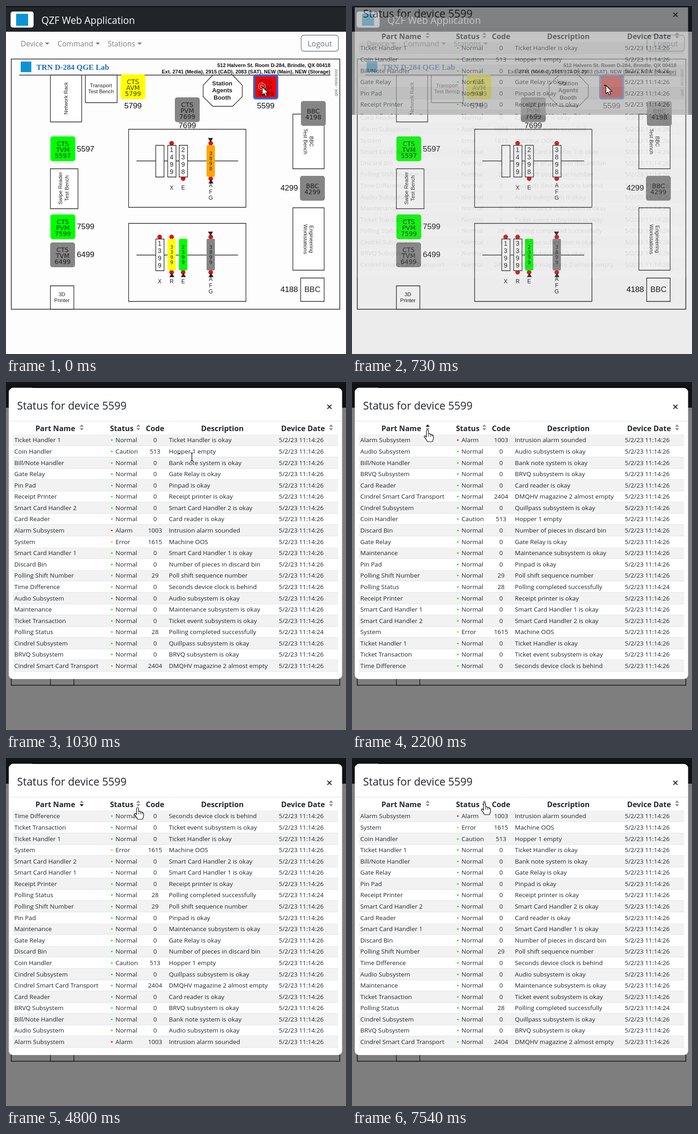
Animation of 739 by 758 pixels, one loop 8 s. Source, as an HTML page with a canvas:

```html
<!DOCTYPE html>
<html lang="en">
<head>
<meta charset="utf-8">
<title>Device status</title>
<style>
  html, body { margin: 0; height: 100%; overflow: hidden; background: #fdfdfd; }
  canvas { display: block; }
</style>
</head>
<body>
<canvas id="stage" width="739" height="758"></canvas>
<script>
const W = 739, H = 758, LOOP = 8000;
const UI = '"Open Sans", sans-serif';
const SANS = '"Liberation Sans", sans-serif';
const SERIF = '"Liberation Serif", serif';
const LABEL = '"DejaVu Sans", sans-serif';
const GREEN = '#0f0', GREY = '#858585', YELLOW = '#ff0', INK = '#212529', LINE = '#222';

const screen2d = document.getElementById('stage').getContext('2d');
const modalCanvas = Object.assign(document.createElement('canvas'), { width: W, height: H });
const modal2d = modalCanvas.getContext('2d');
let g = screen2d; // context currently drawn to

// ---------- helpers ----------
// y is the middle of the capital letters; level text sits on a whole pixel
function text(str, x, y, size, { font = SANS, color = LINE, align = 'center', weight = 400, turn = 0 } = {}) {
  const drop = size * 0.36;
  g.save();
  g.translate(x, turn ? y : Math.round(y + drop));
  g.rotate(turn * Math.PI / 2);
  g.font = `${weight} ${size}px ${font}`;
  g.fillStyle = color;
  g.textAlign = align;
  g.fillText(str, 0, turn ? drop : 0);
  g.restore();
}

// strokes run through pixel centres
function outline(color, width) {
  g.strokeStyle = color;
  g.lineWidth = width;
  g.stroke();
}

function box(x, y, x2, y2, { fill, stroke, r = 0, width = 1.3 } = {}) {
  const shift = stroke ? 0.5 : 0;
  g.beginPath();
  g.roundRect(x + shift, y + shift, x2 - x, y2 - y, r);
  if (fill) { g.fillStyle = fill; g.fill(); }
  if (stroke) outline(stroke, width);
}

function line(x, y, x2, y2, color = LINE, width = 1.3) {
  g.beginPath();
  g.moveTo(x + 0.5, y + 0.5);
  g.lineTo(x2 + 0.5, y2 + 0.5);
  outline(color, width);
}

function poly(points, fill, stroke) {
  g.beginPath();
  points.forEach(([x, y]) => g.lineTo(x + 0.5, y + 0.5));
  g.closePath();
  if (fill) { g.fillStyle = fill; g.fill(); }
  if (stroke) outline(stroke, 1.3);
}

// positive height points down, negative up
const triangle = (x, y, half, height, color) =>
  poly([[x - half, y], [x + half, y], [x, y + height]], color);

function disc(x, y, r, fill, stroke, width = 1) {
  g.beginPath();
  g.arc(x, y, r, 0, 7);
  if (fill) { g.fillStyle = fill; g.fill(); }
  if (stroke) outline(stroke, width);
}

// ---------- floor plan page ----------
function device(x, y, color, lines, ink = 'rgba(0,0,0,.75)') {
  box(x, y, x + 54, y + 54, { fill: color, r: 5 });
  const first = y + 28.7 - 6.5 * (lines.length - 1);
  lines.forEach((s, i) => text(s, x + 27, first + i * 13, 13.7, { font: LABEL, color: ink }));
}

function room(x, y, x2, y2, lines, cx, cy, { turn = 0, size = 11.3, pitch = 13.5, weight } = {}) {
  if (x != null) box(x, y, x2, y2, { fill: '#fff', stroke: LINE });
  lines.forEach((s, i) => {
    const d = (i - (lines.length - 1) / 2) * pitch;
    text(s, cx - turn * d, cy + (turn ? 0 : d), size, { turn, weight });
  });
}

function gate(x, y, id, { color, top, bottom, arrows = '', label = '' }) {
  const dot = cy => disc(x, cy, 4.5, '#f00', '#611', 0.8);
  if (top) dot(y - 4);
  if (bottom) dot(y + 73);
  if (arrows.includes('t')) triangle(x - 1, y - 16, 5.5, 9, LINE);
  if (arrows.includes('b')) triangle(x, y + 83, 5.5, -9, LINE);
  box(x - 9, y, x + 9, y + 69, color ? { fill: color, r: 3 } : { fill: '#fff', stroke: LINE });
  [...id].forEach((c, i) => color
    ? text(c, x, y + 18 + i * 11, 10.5, { font: LABEL })
    : text(c, x, y + 9.5 + i * 16, 14));
  const stacked = label.length > 1;
  [...label].forEach((c, i) => text(c, x, y + (stacked ? 88 : 93) + i * 13.5, 12));
}

function drawGates(fresh) {
  for (const y of [268, 473]) {
    box(266, y, 521, y + 170, { stroke: LINE });
    line(283, y + 69, 504, y + 69);
  }
  gate(334, 303, '', {});
  gate(360, 303, '1499', { top: 1, label: 'X' });
  gate(385, 303, '2398', { bottom: 1, label: 'E' });
  gate(445, 303, '3898', { top: 1, bottom: 1, label: 'AFG', color: fresh ? null : 'orange', arrows: fresh ? '' : 'tb' });
  gate(334, 507, '1399', { top: 1, label: 'X' });
  gate(360, 507, '3399', { top: 1, bottom: 1, label: 'R', color: fresh ? null : YELLOW, arrows: fresh ? '' : 'b' });
  gate(385, 507, '2399', { bottom: 1, label: 'E', color: GREEN, arrows: 'b' });
  gate(445, 507, '3899', { top: 1, bottom: 1, label: 'AFG', color: GREY, arrows: 'tb' });
}

function drawPage(t) {
  box(0, 0, W, H, { fill: '#fdfdfd' });
  box(0, 0, W, 56, { fill: INK });
  box(0, 0, W, 3, { fill: '#15171f' });
  box(10, 12, 60, 47, { fill: '#fff', r: 5 });
  box(22, 17, 48, 43, { fill: '#0a94d6' });
  text('QZF Web Application', 77, 31, 21, { font: UI, color: '#fff', align: 'left' });
  [['Device', 32, 89], ['Command', 112, 199], ['Stations', 221, 290]].forEach(([s, x, caret]) => {
    text(s, x, 82, 15.9, { font: UI, color: '#7f8184', align: 'left' });
    triangle(caret, 79, 5, 5, '#7f8184');
  });
  box(641, 63, 722, 98, { stroke: '#6c757d', r: 6 });
  text('Logout', 682, 82, 16.3, { font: UI, color: '#6c757d' });

  box(11, 115, 725, 660, { stroke: LINE, width: 1.5 });
  box(32, 121, 55, 144, { fill: '#0a94d6' });
  text('TRN D-284 QGE Lab', 66, 132.5, 16.9, { font: SERIF, color: '#1b6fb8', align: 'left', weight: 700 });
  const note = { align: 'right', weight: 700, color: '#111' };
  text('512 Halvern St. Room D-284, Brindle, QX 00418', 705, 129.5, 11, note);
  text('Ext. 2741 (Media), 2915 (CAD), 2083 (SAT), NEW (Main), NEW (Storage)', 705, 143.5, 11, note);
  line(28, 150, 705, 150, LINE, 1.6);
  text('QGE - 06/02/2022', 717, 167, 7.3, { turn: -1, color: '#555' });

  room(96, 150, 164, 252, ['Network Rack'], 130, 201, { turn: -1 });
  room(172, 150, 241, 210, ['Transport', 'Test Bench'], 206.5, 179.5);
  poly([[449, 150], [492, 150], [513, 172], [513, 197], [492, 218], [449, 218], [428, 197], [428, 172]], '#fff', LINE);
  room(null, 0, 0, 0, ['Station', 'Agents', 'Booth'], 470, 183.5, { size: 13, pitch: 15.5, weight: 700 });
  room(623, 235, 691, 354, ['BBC', 'Test Bench'], 657.5, 295, { turn: 1 });
  room(96, 354, 156, 441, ['Swipe Reader', 'Test Bench'], 125, 397, { turn: -1 });
  room(623, 439, 691, 575, ['Engineering', 'Workstations'], 657.5, 508, { turn: 1 });
  room(96, 609, 147, 660, ['3D', 'Printer'], 121.5, 634.5);
  room(640, 592, 691, 643, ['BBC'], 666, 617, { size: 17 });

  device(249, 149, YELLOW, ['CTS', 'AVM', '5799']);
  device(367, 199, GREY, ['CTS', 'PVM', '7699']);
  device(641, 207, GREY, ['BBC', '4198']);
  device(96.5, 284, GREEN, ['CTS', 'TVM', '5597']);
  device(96.5, 454, GREEN, ['CTS', 'PVM', '7599']);
  device(96, 515, GREY, ['CTS', 'TVM', '6499']);
  device(639, 370, GREY, ['BBC', '4299']);
  device(537.5, 149, '#f00', ['CTS', 'AVM', '5599'], t < 300 ? 'rgba(0,0,0,.65)' : 'rgba(0,0,0,.12)');
  box(539, 151, 589, 201, { stroke: t < 300 ? '#1a6fe8' : '#2f7de8', width: 4, r: 3 });

  [['5799', 276, 217], ['7699', 394, 260], ['5599', 564.5, 217], ['5597', 173, 311], ['7599', 173, 480],
   ['6499', 173, 541], ['4299', 615.5, 396], ['4188', 615.5, 617]]
    .forEach(([s, x, y]) => text(s, x, y, 17.2, { color: '#111' }));
  drawGates(t >= 150);
}

// ---------- status dialog ----------
const rows = `Ticket Handler 1|Normal|0|Ticket Handler is okay
Coin Handler|Caution|513|Hopper 1 empty
Bill/Note Handler|Normal|0|Bank note system is okay
Gate Relay|Normal|0|Gate Relay is okay
Pin Pad|Normal|0|Pinpad is okay
Receipt Printer|Normal|0|Receipt printer is okay
Smart Card Handler 2|Normal|0|Smart Card Handler 2 is okay
Card Reader|Normal|0|Card reader is okay
Alarm Subsystem|Alarm|1003|Intrusion alarm sounded
System|Error|1615|Machine OOS
Smart Card Handler 1|Normal|0|Smart Card Handler 1 is okay
Discard Bin|Normal|0|Number of pieces in discard bin
Polling Shift Number|Normal|29|Poll shift sequence number
Time Difference|Normal|0|Seconds device clock is behind
Audio Subsystem|Normal|0|Audio subsystem is okay
Maintenance|Normal|0|Maintenance subsystem is okay
Ticket Transaction|Normal|0|Ticket event subsystem is okay
Polling Status|Normal|28|Polling completed successfully
Cindrel Subsystem|Normal|0|Quillpass subsystem is okay
BRVQ Subsystem|Normal|0|BRVQ subsystem is okay
Cindrel Smart Card Transport|Normal|2404|DMQHV magazine 2 almost empty`
  .split('\n').map(s => s.split('|'));

const severity = ['Normal', 'Caution', 'Error', 'Alarm'];
const byName = (a, b) => a[0].toLowerCase() < b[0].toLowerCase() ? -1 : 1;
const byStatus = (a, b) => severity.indexOf(a[1]) - severity.indexOf(b[1]);

// [start, sorted column, direction, rows]
const sortings = [
  [0, '', 0, rows],
  [2200, 'Part Name', 1, [...rows].sort(byName)],
  [3530, 'Part Name', -1, [...rows].sort((a, b) => byName(b, a))],
  [5540, 'Status', 1, [...rows].sort(byStatus)],
  [7540, 'Status', -1, [...rows].sort((a, b) => byStatus(b, a))],
];
const headings = [['Part Name', 64, 164], ['Status', 226, 287], ['Code', 304], ['Description', 424], ['Device Date', 598, 706]];
const latest = (list, t) => list.findLast(item => item[0] <= t);

function drawModal(t) {
  const [, column, direction, sorted] = latest(sortings, t);
  g = modal2d;
  g.clearRect(0, 0, W, H);
  box(6, 13, 730.5, 647, { fill: '#fff', r: 9 });
  text('Status for device 5599', 24, 51.5, 23.2, { font: UI, color: INK, align: 'left' });
  line(698, 49, 707, 58, INK, 1.8);
  line(707, 49, 698, 58, INK, 1.8);
  line(6, 85, 730, 85, '#dee2e6', 1);
  for (const [s, x, icon] of headings) {
    text(s, x, 101, 16.1, { font: UI, color: INK, align: 'left', weight: 700 });
    if (!icon) continue;
    const shade = d => s === column && d === direction ? '#111' : '#8d8d8d';
    triangle(icon, 97, 4.5, -5, shade(1));
    triangle(icon, 100, 4.5, 5, shade(-1));
  }
  sorted.forEach(([name, status, code, description], i) => {
    const y = Math.round(126.4 + i * 24.58);
    const cell = (s, x, align = 'left') => text(s, x, y, 13.45, { font: UI, color: INK, align });
    if (i % 2 === 0) box(15, y - 12, 722, y + 12, { fill: '#f2f2f2' });
    line(15, y + 12, 722, y + 12, '#dee2e6', 1);
    cell(name, 18);
    box(228.5, y - 1, 231.5, y + 2, { fill: { Alarm: '#f00', Error: 'orange' }[status] || '#0e0' });
    cell(status, 238);
    cell(code, 324, 'center');
    cell(description, 354);
    cell(`5/2/23 11:14:${name === 'Polling Status' ? 24 : 26}`, 593);
  });
  g = screen2d;
}

function overlay(top, bottom, dim, alpha, shift) {
  g.save();
  g.beginPath();
  g.rect(0, top, W, bottom - top);
  g.clip();
  g.fillStyle = `rgba(0,0,0,${dim})`;
  g.fillRect(0, 0, W, H);
  g.globalAlpha = alpha;
  g.drawImage(modalCanvas, 0, shift);
  g.restore();
}

// The dialog drops in with a torn repaint: the upper part runs ahead.
function drawDialog(t) {
  if (t < 460) return;
  drawModal(t);
  const faint = [0.065, 0.1, -55], half = [0.42, 0.46, -35], full = [0.5, 1, 0];
  const upper = t < 580 ? faint : t < 1030 ? half : full;
  const lower = t < 880 ? faint : upper;
  overlay(3, 237, ...upper);
  overlay(237, H, ...lower);
}

// ---------- pointer ----------
const shapes = {
  arrow: new Path2D('M0 0V18L4.2 14.2L7 20.5L10 19.2L7.3 13H13Z'),
  hand: new Path2D('M-2.2 1.5Q0-2 2.2 1.5V9Q5 7 6.5 9.8Q9 8.4 10.3 11Q12.5 10.5 13 13V18Q12.5 22 10.5 25.5H0Q-2.5 20-6.8 15.5Q-7.5 12.5-4.5 13L-2.2 15.5Z'),
  beam: new Path2D('M-3-9Q0-9 0-7Q0-9 3-9M0-7V7M-3 9Q0 9 0 7Q0 9 3 9'),
};
// [start, shape, x, y, trailing dot x, y]
const track = [
  [0, 'arrow', 557, 176],
  [730, 'arrow', 552, 173, 549.5, 173],
  [880, 'arrow', 549, 166],
  [1030, 'beam', 404, 163, 377, 156],
  [1170, 'beam', 327, 154, 303, 146],
  [1320, 'beam', 252, 142, 235, 132],
  [1470, 'beam', 208, 137, 199, 128],
  [1620, 'beam', 188, 125],
  [1750, 'hand', 174, 109],
  [1900, 'hand', 164, 104.5],
  [4290, 'hand', 176, 105],
  [4410, 'hand', 192, 106],
  [4550, 'hand', 218, 111],
  [4680, 'hand', 250, 111],
  [4800, 'hand', 286, 108],
  [4940, 'hand', 291, 101],
  [5090, 'hand', 289, 99],
  [5240, 'hand', 288, 98],
];
const clicks = [[0, 300, 556, 175], [2050, 2200, 165, 104.5], [7420, 7540, 288, 98]];

function drawPointer(t) {
  for (const [from, to, x, y] of clicks) {
    if (t < from || t >= to) continue;
    disc(x, y, 9, '#f00', '#300', 1);
    disc(x, y, 7.8, null, '#fff', 1);
    disc(x, y, 3, null, '#fff', 1);
  }
  const [, shape, x, y, dotX, dotY] = latest(track, t);
  g.save();
  g.translate(x, y);
  g.lineJoin = 'round';
  g.lineWidth = 1.2;
  g.strokeStyle = '#000';
  g.fillStyle = '#fff';
  if (shape !== 'beam') g.fill(shapes[shape]);
  g.stroke(shapes[shape]);
  if (shape === 'hand') {
    for (const k of [2, 6, 9.5]) line(k, 10, k, 14, '#000', 1);
  }
  g.restore();
  if (dotX) disc(dotX, dotY, 1.4, '#000');
}

const start = performance.now();
function render() {
  const t = (performance.now() - start) % LOOP;
  drawPage(t);
  drawDialog(t);
  drawPointer(t);
  requestAnimationFrame(render);
}
render();
</script>
</body>
</html>
```
